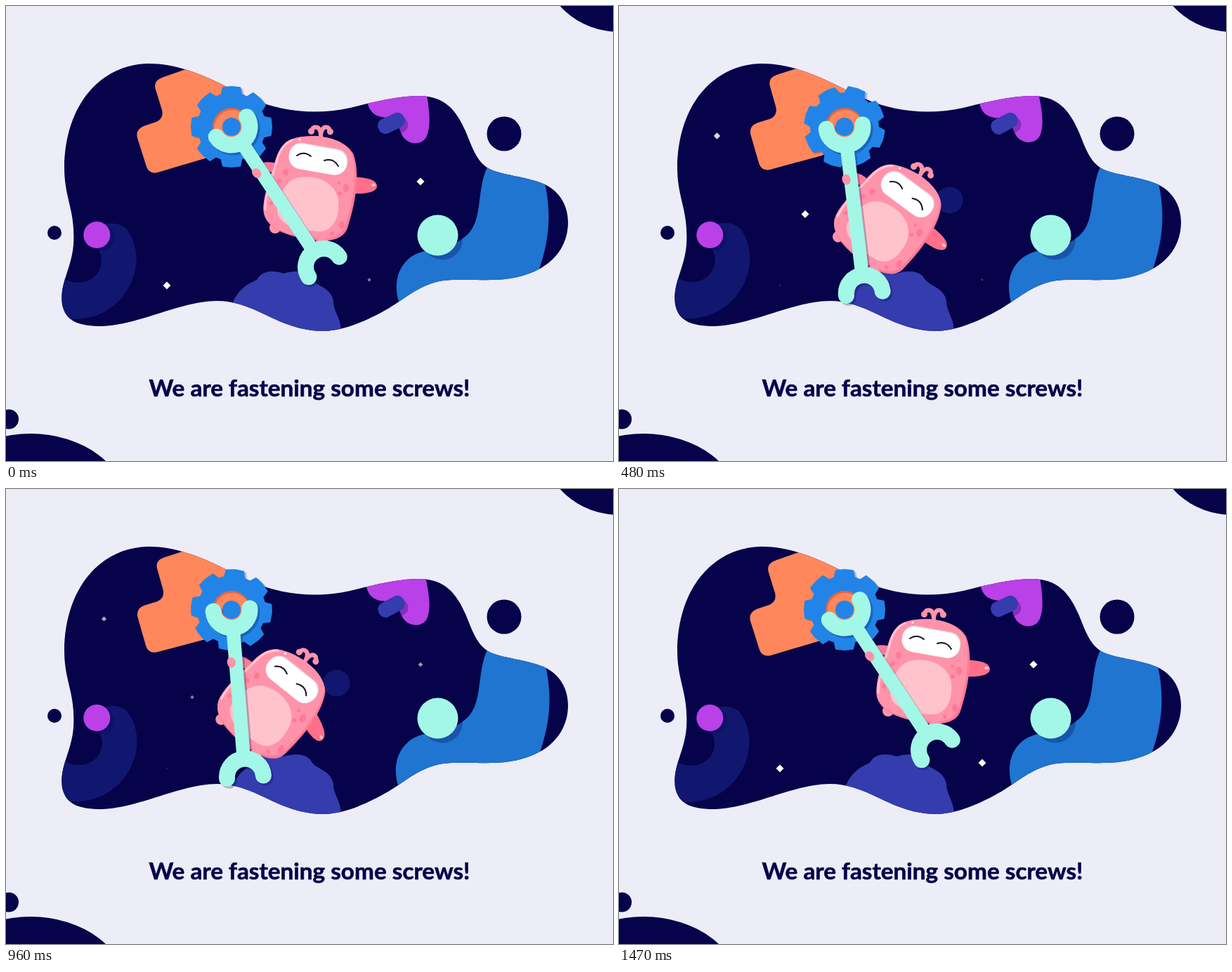
Write an HTML page that moves like this. It is 864 by 648 pixels and loops after 1.5 s.

```html
<!DOCTYPE html>
<html lang="en">
<head>
<meta charset="utf-8">
<title>Fastening screws</title>
<style>
  html, body { margin: 0; width: 100%; height: 100%; overflow: hidden; background: #ecedf7; }
  svg { display: block; width: 864px; height: 648px; }
  .navy { fill: #06034a; }
  .shade { fill: #06034a; opacity: .28; }
  .skin { fill: #ff93aa; }
  .spot { fill: #ff7a97; }
  .line { fill: none; stroke-linecap: round; }
  text { font: 700 33.3px Lato, Inter, sans-serif; text-anchor: middle; stroke: #06034a; stroke-width: .6px; }
</style>
</head>
<body>
<svg viewBox="0 0 864 648">
  <defs>
    <clipPath id="cave">
      <path id="blob" d="M203 82C260 82 310 114 350 132C390 150 440 156 490 145C530 135 560 128 588 128C625 128 641 149 654 178C664 202 670 222 688 232C706 241 742 243 767 254C789 265 800 285 800 308C800 338 784 361 760 374C738 386 715 390 690 390C655 391 630 387 606 395C577 405 562 422 535 436C505 452 480 462 453 463C420 463 395 452 370 440C345 428 325 420 300 420C250 420 190 454 137 456C105 456 85 450 80 425C76 395 93 375 96 340C99 290 83 275 83 230C84 140 135 83 203 82Z"/>
    </clipPath>
    <clipPath id="bodyClip">
      <path id="body" d="M412 188C440 181 480 187 494 210C504 235 499 275 487 313C482 335 455 337 430 332C402 328 372 318 367 295C364 275 376 245 384 218C390 200 398 191 412 188Z"/>
    </clipPath>
    <g id="wrench" class="line">
      <path stroke-width="23" d="M-26 0A26 26 0 0 0 26 0M-26 239A26 26 0 0 1 26 239"/>
      <path stroke-width="19.5" stroke-linecap="butt" d="M0 30V212"/>
    </g>
    <path id="cog" stroke-width="3" stroke-linejoin="round"/>
  </defs>

  <g class="navy">
    <ellipse cx="874" cy="-63" rx="110" ry="100"/>
    <ellipse cx="35" cy="713" rx="137" ry="104"/>
    <circle cx="709" cy="182" r="24.5"/>
    <circle cx="69" cy="323" r="10"/>
    <circle cx="4" cy="588.5" r="14"/>
    <use href="#blob"/>
  </g>

  <g clip-path="url(#cave)">
    <path id="orange" fill="#ff875b" d="M262 88L222 102Q209 107 213 119L222 148Q225 160 214 165L196 171Q184 176 187 188L200 229Q204 240 216 237L290 215L340 180V90Z"/>
    <path id="crescent" fill="#11176f" d="M125 318C140 308 160 306 172 318C192 345 190 385 165 415C145 438 120 447 90 446L70 430L82 388C105 402 136 390 136 362C136 350 130 345 125 340Z"/>
    <path fill="#343cae" d="M320 432C326 405 345 395 357 390C365 375 383 377 395 381C410 377 428 375 436 390C445 400 463 402 466 420C466 436 478 445 477 467H320Z"/>
    <g id="heart">
      <path fill="#ba40e8" d="M514 120C512 148 522 159 545 159C558 161 558 170 562 180C568 198 592 201 599 185C605 170 603 150 598 120Z"/>
      <rect class="shade" x="-20" y="-11" width="40" height="22" rx="10" transform="translate(553 173) rotate(-25)"/>
      <rect fill="#343cae" x="-20" y="-11" width="40" height="22" rx="10" transform="translate(548.5 167) rotate(-25)"/>
    </g>
    <path id="shore" fill="#1f75d0" d="M689 222C666 260 683 310 650 331C628 350 596 341 573 360C553 378 552 405 562 430L700 420L758 377C775 330 776 290 766 248L740 215Z"/>
    <circle class="shade" cx="621" cy="332.5" r="29"/>
    <circle class="shade" cx="135" cy="330" r="19"/>
    <circle fill="#11176f" cx="470.5" cy="276.5" r="19"/>
  </g>
  <circle fill="#a3f7e6" cx="614.5" cy="326.5" r="29"/>
  <circle fill="#ba40e8" cx="129.3" cy="326" r="19"/>
  <g id="stars" fill="#fff"></g>

  <g transform="translate(324 174)" opacity=".22"><use class="turnCog" href="#cog" fill="#06034a" stroke="#06034a"/></g>
  <g transform="translate(321 172)">
    <use class="turnCog" href="#cog" fill="#2284e7" stroke="#2284e7"/>
    <circle r="27" fill="#d9694c"/>
    <circle cx="1" cy="1.5" r="25.5" fill="#ff875b"/>
    <circle r="13" fill="#2284e7"/>
  </g>

  <g class="swing">
    <path class="line" stroke="#ff7a97" stroke-width="14" d="M357 236Q366 226 384 231"/>
    <path class="line" stroke="#ff93aa" stroke-width="6" d="M448 188V183Q447 172 440 172.500Q436 173 435 178M448 183Q450 172 456 172.500Q460 173 461 178"/>
    <circle class="skin" cx="434.500" cy="178.500" r="4.500"/>
    <circle class="skin" cx="461.500" cy="179" r="4.500"/>
    <g id="arm">
      <path fill="#ff6f89" d="M490 243C510 244 528 246 528 257C527 266 510 268 490 267Z"/>
      <ellipse fill="#ffc3cc" cx="523" cy="255" rx="3" ry="2"/>
    </g>
    <ellipse class="skin" cx="383" cy="316" rx="8" ry="8"/>
    <use href="#body" fill="#ff7a97"/>
    <g clip-path="url(#bodyClip)">
      <use class="skin" href="#body" transform="translate(-3 -3)"/>
      <path class="line" stroke="#ffc3cc" stroke-width="3" d="M369 290C369 265 379 245 386 219Q391 199 407 191"/>
      <g class="spot">
        <ellipse cx="484" cy="259" rx="4.500" ry="6"/>
        <circle cx="474" cy="252" r="2.500"/>
        <circle cx="475" cy="267" r="3"/>
        <ellipse cx="398" cy="237" rx="4" ry="5"/>
        <circle cx="389" cy="249" r="3.500"/>
        <ellipse cx="478" cy="312" rx="4" ry="6"/>
        <circle cx="464" cy="324" r="3"/>
        <circle cx="377" cy="281" r="3"/>
      </g>
    </g>
    <path fill="#ffc3cc" d="M418 244C445 240 469 253 473 276C475 302 465 321 446 321C415 320 388 311 386 293C388 268 398 247 418 244Z"/>
    <g transform="translate(444.500 218) rotate(10)">
      <rect fill="#dfdce6" x="-42" y="-19" width="84" height="37" rx="17"/>
      <rect fill="#fff" x="-42" y="-17.500" width="83" height="36" rx="17"/>
    </g>
    <path class="line" stroke="#180b2c" stroke-width="2" d="M414 213Q424 206 434 214M453 220Q466 216 473 228"/>
    <circle fill="#fff" cx="418" cy="190" r="1.500"/>
    <ellipse class="skin" cx="450" cy="336" rx="9" ry="5.500"/>
  </g>

  <g transform="translate(324 175)" opacity=".25"><use class="turnWrench" href="#wrench" stroke="#06034a"/></g>
  <g transform="translate(321 172)"><use class="turnWrench" href="#wrench" stroke="#a3f7e6"/></g>
  <g class="swing"><ellipse class="skin" cx="357" cy="238" rx="6" ry="7.500" transform="rotate(-35 357 238)"/></g>

  <text x="432" y="556" class="navy">We are fastening some screws!</text>
</svg>
<script>
const LOOP = 1500;
const TIMES = [0, 240, 480, 660, 735, 960, 1230, 1470, LOOP];
const WRENCH = [0, 6, 26.5, 43.1, 46, 28.8, 5.3, 0, 0];
const COG = [0, -6, -27, -49, -53, -40, -6, 0, 0];
const ARM = [0, -9, 9, 29, 32, 30, 10, 0, 0];
const STARS = [
  { x: 590, y: 250, size: [1, .25, 0, .15, .25, .6, .85, 1, 1] },
  { x: 229, y: 398, size: [1, .75, .22, 0, 0, .2, .75, 1, 1] },
  { x: 517, y: 390, size: [.48, .42, .28, .12, .05, 0, .6, 1, 1] },
  { x: 139.5, y: 185, size: [0, .35, .85, 1, .95, .65, .25, 0, 0] },
  { x: 265, y: 296.5, size: [0, .65, 1, .85, .75, .5, .15, 0, 0] }
];
const all = selector => document.querySelectorAll(selector);
const place = (selector, transform) => all(selector).forEach(el => el.setAttribute('transform', transform));

function slope(v, i) {
  if (i === 0 || i === v.length - 1 || (v[i] - v[i - 1]) * (v[i + 1] - v[i]) <= 0) return 0;
  return (v[i + 1] - v[i - 1]) / (TIMES[i + 1] - TIMES[i - 1]);
}

// Smooth Hermite curve through the poses, flat at each turning point.
function sample(v, t) {
  const i = TIMES.findIndex(time => time > t) - 1;
  const span = TIMES[i + 1] - TIMES[i], u = (t - TIMES[i]) / span, r = 1 - u;
  return r * r * (1 + 2 * u) * v[i] + u * u * (3 - 2 * u) * v[i + 1]
    + span * u * r * (r * slope(v, i) - u * slope(v, i + 1));
}

const rim = [];
for (let tooth = 0; tooth < 8; tooth++) {
  for (const [offset, radius] of [[-17, 47.5], [-12, 56.5], [0, 56.5], [12, 56.5], [17, 47.5]]) {
    const a = (tooth * 45 + offset) * Math.PI / 180;
    rim.push(`${(radius * Math.sin(a)).toFixed(2)},${(-radius * Math.cos(a)).toFixed(2)}`);
  }
}
document.getElementById('cog').setAttribute('d', `M${rim.join('L')}Z`);

for (const star of STARS) {
  star.el = document.createElementNS('http://www.w3.org/2000/svg', 'path');
  star.el.setAttribute('d', 'M0-5.5L5.5 0L0 5.5L-5.5 0Z');
  document.getElementById('stars').append(star.el);
}

function draw(now) {
  const t = now % LOOP;
  const swing = sample(WRENCH, t);
  const drift = (1 - Math.cos(2 * Math.PI * t / LOOP)) / 2;
  place('.swing', `rotate(${swing} 321 172)`);
  place('.turnWrench', `rotate(${swing - 33.4})`);
  place('.turnCog', `rotate(${sample(COG, t)})`);
  place('#arm', `rotate(${sample(ARM, t)} 494 256)`);
  place('#orange', `rotate(${2 * drift} 380 200)`);
  place('#heart', `rotate(${-4 * drift} 555 165)`);
  place('#crescent', `translate(${drift} ${-drift})`);
  place('#shore', `translate(660 320) scale(${1 + .012 * drift}) translate(-660 -320)`);
  for (const { el, x, y, size } of STARS) {
    const s = sample(size, t);
    el.setAttribute('transform', `translate(${x} ${y}) scale(${s})`);
    el.setAttribute('opacity', s);
  }
  requestAnimationFrame(() => draw(performance.now()));
}
draw(performance.now());
</script>
</body>
</html>
```
